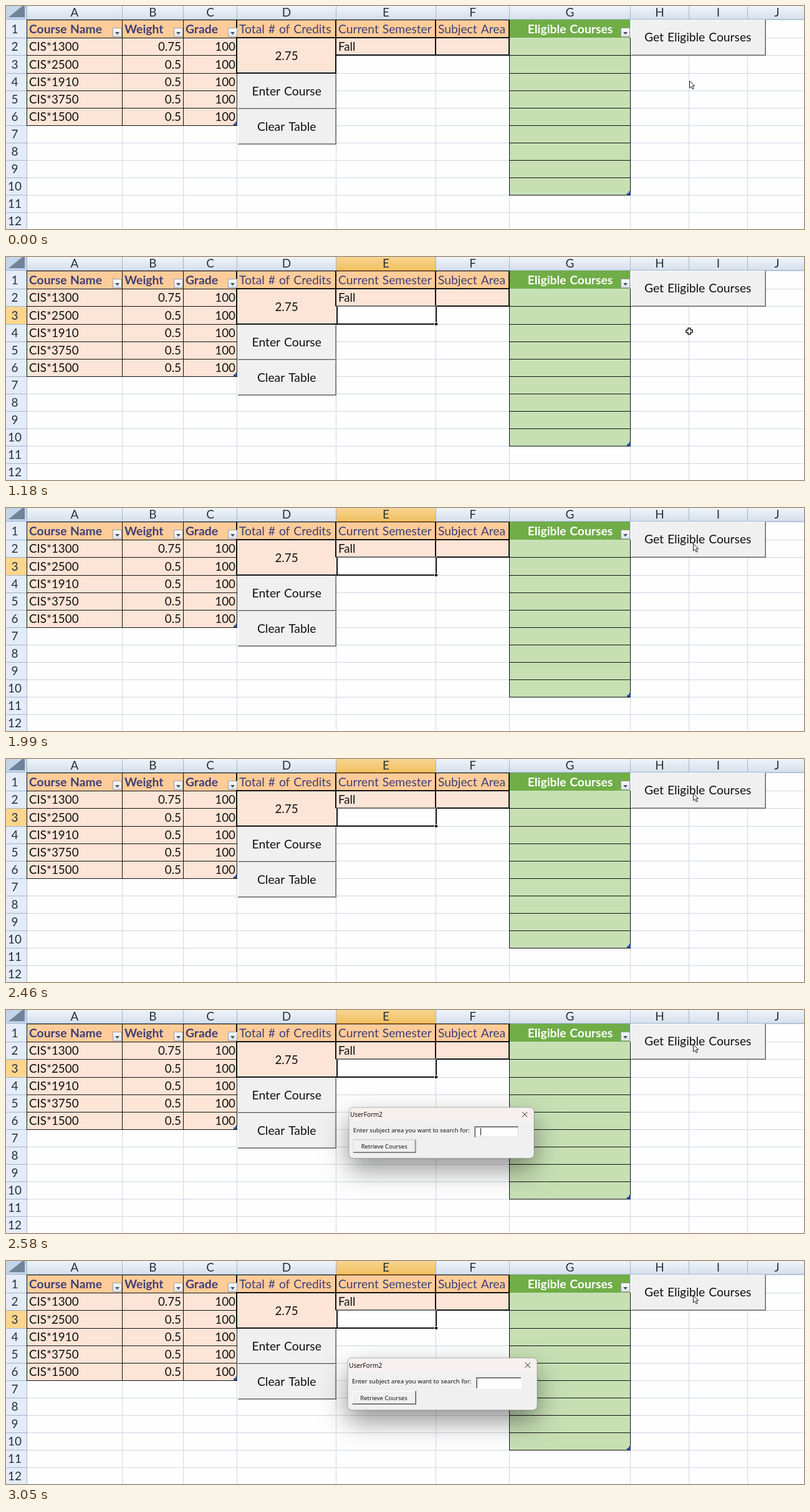
Animation of 1280 by 359 pixels, one loop 3120 ms. Source, as an HTML page with a canvas:

```html
<!DOCTYPE html>
<html lang="en">
<head>
<meta charset="utf-8">
<title>Eligible courses sheet</title>
<style>
html, body { margin: 0; width: 100%; height: 100%; overflow: hidden; background: #fefefe; }
canvas { display: block; }
</style>
</head>
<body>
<canvas id="stage" width="1280" height="359"></canvas>
<script>
const ctx = document.getElementById('stage').getContext('2d');
const LOOP = 3120;
const SHEET = 'Lato, Carlito, sans-serif';
const FORM = '"Noto Sans", "Open Sans", sans-serif';
const cols = [33, 186, 284, 370, 529, 689, 807, 1001, 1095, 1189, 1283];
const rows = [22, 51, 79, 108, 136, 164, 192, 220, 248, 276, 304, 332, 360];
const courses = [
  ['CIS*1300', '0.75'], ['CIS*2500', '0.5'], ['CIS*1910', '0.5'],
  ['CIS*3750', '0.5'], ['CIS*1500', '0.5']
];
const INK = '#111', GRID = '#d0d7e5', PEACH = '#fce4d6', ORANGE = '#ffcc99', NAVY = '#3f3f76';

function box(x0, y0, x1, y1, color) {
  ctx.fillStyle = color;
  ctx.fillRect(x0, y0, x1 - x0, y1 - y0);
}
const hline = (x0, x1, y, color = INK, w = 1) => box(x0, y, x1, y + w, color);
const vline = (x, y0, y1, color = INK, w = 1) => box(x, y0, x + w, y1, color);
// two-pixel borders lie on the grid line and the pixel before it
const hthick = (x0, x1, y) => hline(x0, x1, y - 1, INK, 2);
const vthick = (x, y0, y1) => vline(x - 1, y0, y1, INK, 2);

function text(str, x, y, { color = INK, align = 'left', font = `19.3px ${SHEET}`, gap = 1 } = {}) {
  ctx.font = font;
  ctx.fillStyle = color;
  ctx.textAlign = align;
  ctx.wordSpacing = gap + 'px';
  ctx.fillText(str, x, y);
}

function shape(points, fill, stroke, width = 1) {
  ctx.beginPath();
  points.forEach(([x, y]) => ctx.lineTo(x, y));
  ctx.closePath();
  if (fill) { ctx.fillStyle = fill; ctx.fill(); }
  if (stroke) { ctx.strokeStyle = stroke; ctx.lineWidth = width; ctx.stroke(); }
}

function fade(y0, y1, from, to) {
  const g = ctx.createLinearGradient(0, y0, 0, y1);
  g.addColorStop(0, from);
  g.addColorStop(1, to);
  return g;
}

function headers(selected) {
  box(0, 0, 1280, 22, fade(-6, 22, '#f7fafd', '#d5deeb'));
  box(0, 22, 33, 359, '#e4ecf7');
  if (selected) {
    box(cols[4], 0, cols[5], 21, fade(-6, 22, '#f9d99f', '#f1c15f'));
    box(0, rows[2], 33, rows[3], '#ffd58d');
  }
  box(0, 0, 33, 21, '#c3d5eb');
  shape([[30, -3], [30, 18], [4, 18]], '#728399');
  hline(0, 1280, 21, '#9eb6ce');
  vline(33, 0, 359, '#9eb6ce');
  cols.slice(1).forEach(x => vline(x, 0, 21, '#9eb6ce'));
  rows.slice(1).forEach(y => hline(0, 33, y, '#9eb6ce'));
  if (selected) {
    hline(cols[4], cols[5] + 1, 21, '#f29536');
    vline(33, rows[2], rows[3], '#f29536');
  }
  const style = { color: '#263238', align: 'center', font: `19px ${SHEET}` };
  [...'ABCDEFGHIJ'].forEach((c, i) => text(c, (cols[i] + cols[i + 1]) / 2 + 0.5, 17, style));
  for (let i = 0; i < 12; i++) text(String(i + 1), 14, rows[i + 1] - 7, style);
}

function filterButton(right) {
  box(right - 15, 35, right, 50, '#9a9fa8');
  box(right - 14, 36, right - 1, 49, fade(36, 49, '#fbfcfd', '#dde3ec'));
  shape([[right - 11, 42], [right - 4, 42], [right - 7.5, 46]], '#444b58');
}

function button(label, x0, y0, x1, y1) {
  box(x0, y0, x1, y1, '#696969');
  box(x0, y0, x1 - 1, y1 - 1, '#fff');
  box(x0 + 1, y0 + 1, x1 - 1, y1 - 1, '#a0a0a0');
  box(x0 + 1, y0 + 1, x1 - 2, y1 - 2, '#f0f0f0');
  text(label, (x0 + x1) / 2 - 0.8, Math.round((y0 + y1) / 2 + 6), { align: 'center' });
}

function selection() {
  box(528, 80, 530, 107, '#fefefe');
  box(530, 78, 691, 109, INK);
  box(530, 78, 691, 80, '#707070');
  box(532, 80, 689, 107, '#fefefe');
  box(687, 105, 692, 110, '#fefefe');
  box(688, 106, 692, 110, INK);
}

function sheet(selected) {
  box(0, 0, 1280, 359, '#fefefe');
  cols.forEach(x => vline(x, 22, 359, GRID));
  rows.forEach(y => hline(33, 1280, y, GRID));
  headers(selected);

  box(34, 22, 807, 51, ORANGE);
  box(34, 51, 370, 192, PEACH);
  box(370, 51, 529, 108, PEACH);
  box(529, 51, 807, 79, PEACH);
  box(807, 22, 1001, 51, '#70ad47');
  box(807, 51, 1001, 304, '#c6e0b4');

  // course table
  hline(34, 807, 22);
  rows.slice(1, 7).forEach(y => hline(34, 371, y));
  cols.slice(0, 4).forEach(x => vline(x, 22, 193));
  // eligible list
  vline(807, 22, 305);
  vline(1001, 51, 305);
  rows.slice(2, 11).forEach(y => hline(807, 1002, y));
  // totals, semester and subject
  hthick(370, 808, 51);
  hthick(370, 530, 108);
  hthick(529, 808, 79);
  vthick(370, 22, 109);
  vthick(529, 22, selected ? 79 : 109);
  vthick(689, 22, 80);
  vthick(807, 22, 80);

  const title = { color: NAVY };
  const bold = { color: NAVY, font: `bold 19.3px ${SHEET}` };
  const cell = { font: `18.8px ${SHEET}` };
  text('Course Name', 37, 44, bold);
  text('Weight', 190, 44, bold);
  text('Grade', 288, 44, bold);
  text('Total # of Credits', 374, 44, title);
  text('Current Semester', 533, 44, title);
  text('Subject Area', 693, 44, title);
  text('Eligible Courses', 905, 44, { ...bold, color: '#fff', align: 'center' });
  courses.forEach(([name, weight], i) => {
    const y = rows[i + 2] - 7;
    text(name, 37, y, cell);
    text(weight, 281, y, { ...cell, align: 'right' });
    text('100', 368, y, { ...cell, align: 'right' });
  });
  text('2.75', 450, 87, { ...cell, align: 'center' });
  text('Fall', 533, 72, cell);

  [186, 284, 371, 1001].forEach(filterButton);
  [[371, 192], [1002, 304]].forEach(([x, y]) => {
    shape([[x, y - 6], [x, y], [x - 6, y], [x - 6, y - 3], [x - 3, y - 3], [x - 3, y - 6]], '#2f4fa0');
  });

  button('Enter Course', 372, 109, 530, 166);
  button('Clear Table', 372, 166, 530, 223);
  button('Get Eligible Courses', 1002, 22, 1219, 80);
  if (selected) selection();
}

function dialog(scale, alpha, caret) {
  const label = { font: `9.8px ${FORM}`, gap: 0 };
  ctx.save();
  ctx.globalAlpha = alpha;
  ctx.translate(635, 190);
  ctx.scale(scale, scale);
  ctx.translate(-635, -190);

  ctx.save();
  ctx.shadowColor = 'rgba(0,0,0,.42)';
  ctx.shadowBlur = 42;
  ctx.shadowOffsetY = 18;
  ctx.beginPath();
  ctx.roundRect(548, 156, 304, 84, 7);
  ctx.fillStyle = '#f0f0f0';
  ctx.fill();
  ctx.restore();

  ctx.save();
  ctx.clip();
  box(548, 156, 852, 179, '#f7f0ee');
  ctx.restore();
  ctx.strokeStyle = 'rgba(90,90,90,.45)';
  ctx.lineWidth = 1;
  ctx.stroke();

  text('UserForm2', 550, 172, { font: `10.2px ${FORM}` });
  ctx.beginPath();
  ctx.moveTo(832.5, 163.5); ctx.lineTo(841, 172);
  ctx.moveTo(841, 163.5); ctx.lineTo(832.5, 172);
  ctx.strokeStyle = '#222';
  ctx.stroke();

  text('Enter subject area you want to search for:', 555, 197, label);
  box(754, 187, 827, 206, '#fff');
  box(754, 187, 826, 205, '#888');
  box(755, 188, 826, 205, '#666');
  box(756, 189, 826, 205, '#fff');
  if (caret) vline(764, 190, 202);

  box(555, 209, 658, 231, '#555');
  box(555, 209, 657, 230, '#fff');
  box(556, 210, 657, 230, '#a0a0a0');
  box(556, 210, 656, 229, '#f0f0f0');
  text('Retrieve Courses', 606, 224, { ...label, font: `9.6px ${FORM}`, align: 'center' });
  ctx.restore();
}

function arrow(x, y) {
  const outline = [[0, 0], [0, 11.5], [2.7, 9], [4.6, 13.4], [6.6, 12.5], [4.7, 8.2], [8.2, 8.2]];
  shape(outline.map(([a, b]) => [x + a, y + b]), '#fff', '#222');
}

function cross(x, y) {
  const a = 5, b = 2;
  const outline = [[-b, -a], [b, -a], [b, -b], [a, -b], [a, b], [b, b],
    [b, a], [-b, a], [-b, b], [-a, b], [-a, -b], [-b, -b]];
  shape(outline.map(([p, q]) => [x + p, y + q]), '#fff', '#111', 1.4);
}

// progress 0..1 in n held steps, the first at a and the last at b
function steps(t, a, b, n) {
  if (t < a) return 0;
  return Math.min(n, Math.floor((t - a) / (b - a) * (n - 1) + 1e-6) + 1) / n;
}

function pointer(t) {
  if (t < 390) return arrow(1096.5, 120.5);
  const rise = steps(t, 1180, 1650, 8) ** 2;
  const enter = 1 - (1 - steps(t, 1720, 1990, 5)) ** 2;
  const x = 1096 + 6 * enter;
  const y = 120 - 35 * rise - 28 * enter;
  if (t >= 2320) arrow(1102.5, 55.5);
  else if (y < 79) arrow(x + 0.5, y + 0.5);
  else cross(x, y);
}

function draw(t) {
  sheet(t >= 340);
  if (t >= 2510) {
    const p = steps(t, 2510, 2710, 4);
    dialog(1 - 0.092 * (1 - p) ** 2, Math.min(1, p * 2), t < 3050);
  }
  pointer(t);
}

const start = performance.now();
function tick() {
  draw((performance.now() - start) % LOOP);
  requestAnimationFrame(tick);
}
tick();
</script>
</body>
</html>
```
